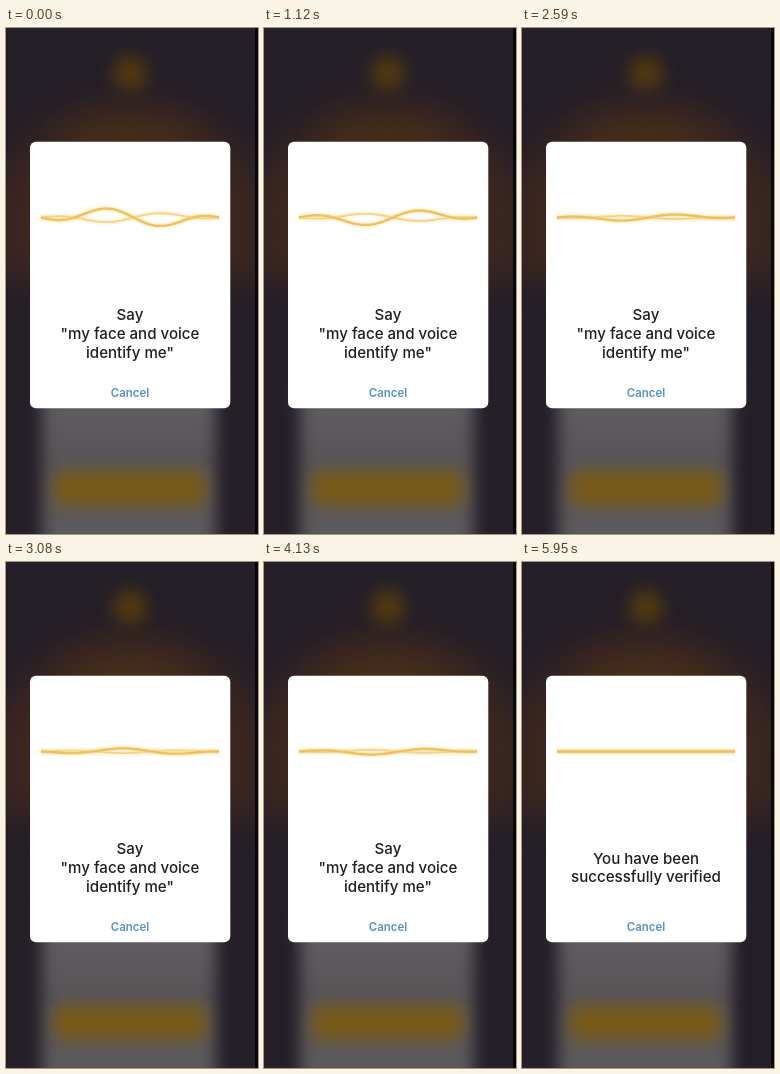
Animation, 252 px wide and 506 px high, one loop 6.02 s. Source, as an HTML page:

```html
<!DOCTYPE html>
<html lang="en">
<head>
<meta charset="utf-8">
<title>Voice check</title>
<style>
html, body { margin: 0; width: 100%; height: 100%; overflow: hidden; background: #251f28; }
svg { display: block; width: 252px; height: 506px; }
filter { color-interpolation-filters: sRGB; }
text { font: 500 15.1px Inter, "Liberation Sans", sans-serif; text-anchor: middle; fill: #1f1e22; }
#cancel { font-size: 11.4px; font-weight: 600; fill: #5492c4; }
.line { fill: none; stroke: #efc15a; }
.glow { stroke: #f6d98f; stroke-width: 4.5; opacity: .55; filter: url(#soft); }
</style>
</head>
<body>
<svg viewBox="0 0 252 506">
  <defs>
    <filter id="soft" filterUnits="userSpaceOnUse" x="20" y="150" width="210" height="210"><feGaussianBlur stdDeviation="1.2"/></filter>
    <filter id="blur" filterUnits="userSpaceOnUse" x="-60" y="-60" width="372" height="650"><feGaussianBlur stdDeviation="8"/></filter>
    <filter id="haze" filterUnits="userSpaceOnUse" x="-100" y="-60" width="452" height="650"><feGaussianBlur stdDeviation="17"/></filter>
    <linearGradient id="panel" x2="0" y2="1">
      <stop stop-color="#646165"/><stop offset=".5" stop-color="#575458"/><stop offset="1" stop-color="#5e5b5f"/>
    </linearGradient>
  </defs>
  <rect width="252" height="506" fill="#251f28"/>
  <path d="M-10 252V165Q40 72 124 72T258 165V252Z" fill="#3d271f" filter="url(#haze)"/>
  <ellipse cx="124" cy="122" rx="62" ry="22" fill="#49301a" filter="url(#haze)"/>
  <circle cx="124" cy="45" r="17" fill="#51390f" filter="url(#blur)"/>
  <rect x="36" y="350" width="174" height="170" fill="url(#panel)" filter="url(#blur)"/>
  <rect x="48" y="443" width="152" height="35" rx="6" fill="#775a18" filter="url(#blur)"/>
  <rect x="249" width="3" height="506" fill="#08070a"/>
  <rect x="24" y="113.7" width="200.3" height="266.5" rx="6" fill="#fff"/>
  <g id="back" opacity=".7"><path class="line glow"/><path class="line" stroke-width="1.8"/></g>
  <g id="front"><path class="line glow"/><path class="line" stroke-width="2.3"/></g>
  <g id="prompt">
    <text x="124" y="292">Say</text>
    <text x="124" y="311">"my face and voice</text>
    <text x="124" y="330">identify me"</text>
  </g>
  <g id="spinner">
    <path class="line glow" d="M124 291A23 23 0 0 1 147 314"/>
    <path class="line" stroke-width="4.6" d="M124 291A23 23 0 0 1 147 314"/>
  </g>
  <g id="done">
    <text x="124" y="302">You have been</text>
    <text x="124" y="320">successfully verified</text>
  </g>
  <text id="cancel" x="124" y="369.3">Cancel</text>
</svg>
<script>
const LOOP = 6020, STEP = 70, LISTEN_END = 4480, VERIFIED = 5390;
const LEFT = 35, WIDTH = 178, MID = 189.5;
const WAVELENGTH = WIDTH / 1.5, SPEED = 0.16, FIRST_CREST = 98;
// [time, wave height] pairs
const heights = [[0, 9.7], [280, 13], [630, 10], [1120, 8], [1680, 4.2], [2590, 3.4], [3570, 3], [4060, 4], [4410, 0]];
const $ = id => document.getElementById(id);

function heightAt(t) {
  const i = heights.findIndex(k => k[0] > t);
  if (i < 0) return 0;
  const [t0, a] = heights[i - 1], [t1, b] = heights[i];
  return a + (b - a) * (t - t0) / (t1 - t0);
}

function wave(id, height, crest) {
  const points = [];
  for (let x = 0; x <= WIDTH; x += 2) {
    const u = 2 * x / WIDTH - 1;
    const phase = 2 * Math.PI * (LEFT + x - crest) / WAVELENGTH;
    const y = MID - height * (1 - u * u) * Math.cos(phase);
    points.push(LEFT + x + " " + y.toFixed(2));
  }
  for (const path of $(id).children) path.setAttribute("d", "M" + points.join("L"));
}

function show(id, on) {
  $(id).style.display = on ? "" : "none";
}

function draw(now) {
  const t = Math.floor(now % LOOP / STEP) * STEP;
  const height = heightAt(t), crest = FIRST_CREST + SPEED * t;
  wave("front", height, crest);
  wave("back", -height / 2, crest);
  show("prompt", t < LISTEN_END);
  show("spinner", t >= LISTEN_END && t < VERIFIED);
  show("done", t >= VERIFIED);
  $("spinner").setAttribute("transform", `rotate(${(t - 4900) * 0.36} 124 314)`);
  requestAnimationFrame(draw);
}
draw(performance.now());
</script>
</body>
</html>
```
